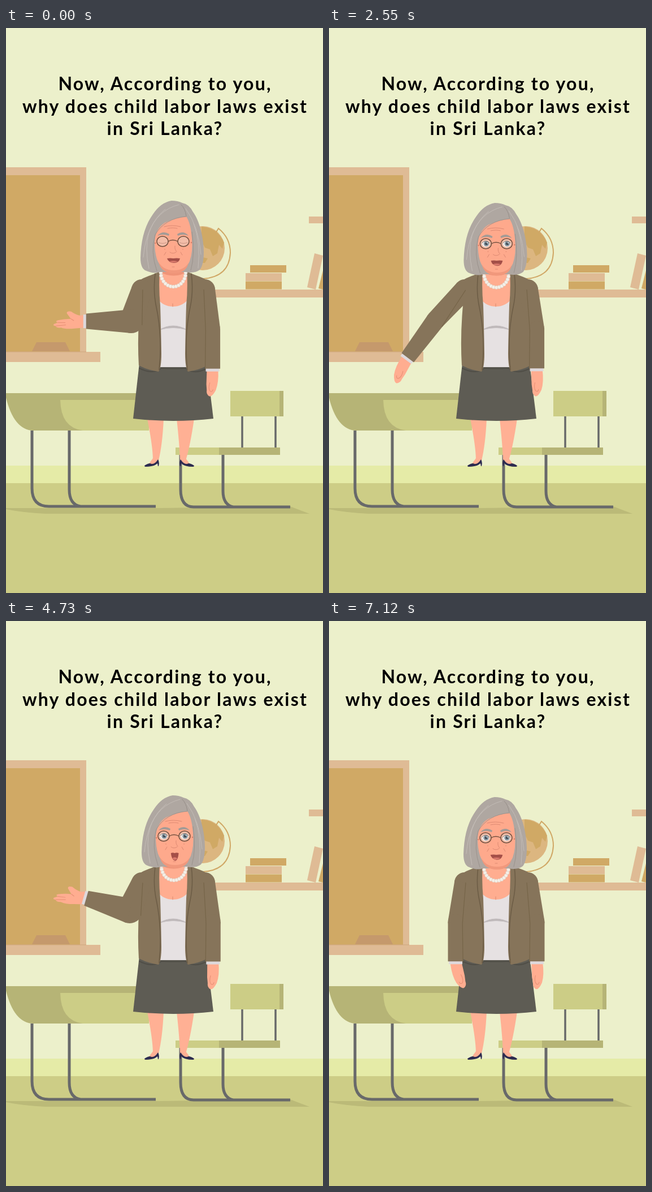
Write an HTML page that moves like this. It is 561 px wide and 998 px high and loops after 7.18 s.

```html
<!DOCTYPE html>
<html lang="en">
<head>
<meta charset="utf-8">
<title>Classroom question</title>
<style>
html, body { margin: 0; height: 100%; overflow: hidden; background: #ecf0cb; }
svg { display: block; width: 100vw; height: 100vh; }
text { font: 700 32px Lato, sans-serif; letter-spacing: 2.2px; text-anchor: middle; }
.line { fill: none; stroke-linecap: round; }
</style>
</head>
<body>
<svg viewBox="0 0 561 998">
  <rect width="561" height="998" fill="#ecf0cb"/>
  <rect y="773" width="561" height="31" fill="#e5eba7"/>
  <rect y="804" width="561" height="194" fill="#cdcd86"/>
  <path d="M0 848H265L503 845L537 858H70Q30 856 0 850Z" fill="#bbba78"/>
  <text x="281.5" y="110">Now, According to you,</text>
  <text x="281.5" y="149.5">why does child labor laws exist</text>
  <text x="281.5" y="189">in Sri Lanka?</text>

  <!-- board -->
  <path d="M0 246H142V572H167V590H0Z" fill="#dfbb95"/>
  <path d="M0 260H131V572H0Z" fill="#d0a965"/>
  <path d="M54 555H105L113 571H46Z" fill="#c5996c"/>
  <path d="M0 572H142" stroke="#cfa77f"/>

  <!-- shelf, books and globe -->
  <path d="M330 462H561V476H330ZM536 333H561V345H536ZM424 433H488V447H424Z" fill="#dfbb95"/>
  <path d="M432 419H496V432H432ZM424 447.5H488V461.5H424ZM561 428L553 460L561 462Z" fill="#d0a965"/>
  <path d="M546 398L561 402L548 462L533 458Z" fill="#dfbb95"/>
  <circle cx="348" cy="389" r="39" fill="#dcb680"/>
  <path d="M346 351Q374 352 386 379L383 390L377 383L374 398L366 403L361 391L352 388L346 376ZM340 403L357 407L352 415L340 415Z" fill="#d0a965"/>
  <path class="line" d="M371 362L376 354Q397 371 397 397Q395 440 348 443Q338 443 330 440" stroke="#d0a765" stroke-width="2"/>

  <!-- desk -->
  <g fill="none" stroke="#68696a" stroke-width="5">
    <path d="M112 711V815Q112 842 132 845M46 711V813Q46 845 76 845H265"/>
    <path d="M384 754V818Q384 842 402 846M309 754V815Q309 846 332 846H503"/>
    <path d="M418 686V742M477 686V742" stroke-width="3.5"/>
  </g>
  <path d="M0 645H253V711H48Q14 710 0 653Z" fill="#b6b476"/>
  <path d="M96 657H253V711H136Q97 706 96 657Z" fill="#cccd86"/>

  <!-- chair -->
  <path d="M397 641H491V686H397ZM300 741H378V754H300Z" fill="#cccd86"/>
  <path d="M484 641H491V686H484ZM377 741H485V754H377Z" fill="#b6b476"/>

  <!-- legs and shoes -->
  <defs>
    <g id="shoe">
      <path d="M260 760H270L269 769L259 771L252 771Z" fill="#ffb094"/>
      <path d="M245 773Q251 769 255 769Q262 773 269 762Q272 767 270 774H269L268 769Q262 775 247 775Q245 775 245 773Z" fill="#2c2b50"/>
    </g>
  </defs>
  <path d="M250 690H279Q277 735 270 764H260Q260 740 250 690ZM302 690H333Q326 738 318 764H308Q307 735 302 690Z" fill="#ffb094"/>
  <use href="#shoe"/><use href="#shoe" transform="matrix(-1 0 0 1 578 0)"/>

  <!-- skirt, blouse and jacket -->
  <path d="M236 592H355L367 690Q296 698 225 690Z" fill="#5e5c54"/>
  <path d="M236 601Q260 613 275 601Q296 602 318 601Q332 613 354 602" class="line" stroke="#504e47" stroke-width="2"/>
  <path d="M268 418H324V510H268Z" fill="#ffad90"/>
  <path d="M270 424H322V430Q297 445 270 430Z" fill="#ef9478"/>
  <path d="M268 478Q278 492 296 492Q312 492 324 478V599H268Z" fill="#e6e1e2"/>
  <path d="M272 533Q283 526 296 526Q308 526 320 533Q296 526 272 533Z" fill="#bdb7b8" stroke="#c8c2c4"/>
  <path class="line" d="M295 487V492" stroke="#d98a70"/>
  <defs>
    <g id="jacket">
      <path d="M272 430Q264 434 250 439Q233 445 225 456L237 490Q232 545 235 596Q250 604 270 607Q275 600 275 575Q274 520 273 490Q270 460 272 430Z" fill="#86745a"/>
      <path class="line" d="M264 434Q260 465 266 493Q277 545 271 604" stroke="#6d5d46" stroke-width="1.6"/>
    </g>
  </defs>
  <use href="#jacket"/><use href="#jacket" transform="matrix(-1 0 0 1 592 0)"/>
  <g id="armL"></g>
  <g transform="matrix(-1 0 0 1 592 0)"><g id="armR"></g></g>
  <g id="pearls" fill="#f5f0e8" stroke="#d9cabd" stroke-width=".6"></g>

  <!-- head -->
  <g id="head">
    <path d="M293 305Q304 305 312 309Q324 311 331 325C343 341 350 372 350 396Q350 418 343 427Q334 434 318 431H272Q262 435 246 428Q238 423 238 406C239 375 245 350 260 329Q274 308 293 305Z" fill="#afa7a1"/>
    <path d="M263 378Q264 355 281 344Q300 335 319 333Q327 345 329 372Q331 395 325 412Q318 428 297 429Q274 428 267 408Q263 395 263 378Z" fill="#fea98c"/>
    <path d="M270 414Q279 428 297 428Q315 428 323 415Q319 433 297 433Q275 433 270 414Z" fill="#f1987c"/>
    <g class="line" stroke="#c3bcb6">
      <path d="M306 312Q267 322 253 362Q245 388 253 425M282 320Q248 347 243 405M332 345Q345 380 340 424M318 319Q341 350 345 400"/>
      <path d="M319 333Q281 336 264 365Q255 395 267 429M329 360Q335 400 327 428" stroke="#9a928c"/>
      <path d="M310 312Q317 319 319 332" stroke="#968e88"/>
    </g>
    <g class="line" stroke="#d98670" stroke-width=".9">
      <path d="M280 351Q294 347 309 351M286 354Q296 352 303 354M290 396Q295 400 301 396M299 385Q298 391 302 395M283 396L280 401M309 396L312 401M294 422H298"/>
    </g>
    <path d="M268 367Q277 357 289 364L288 367Q278 363 268 367ZM323 367Q314 357 303 364L304 367Q313 363 323 367Z" fill="#a39b96"/>
    <g fill="#d98069"><circle cx="264" cy="380" r="1.3"/><circle cx="328" cy="379" r="1.3"/><circle cx="281" cy="391" r=".7"/><circle cx="313" cy="391" r=".7"/></g>
    <g fill="#f2bda8"><ellipse cx="277" cy="377" rx="10" ry="9"/><ellipse cx="314" cy="377" rx="10" ry="9"/></g>
    <path class="line" d="M270 379Q277 382 284 379M307 379Q314 382 321 379" stroke="#c99482"/>
    <g id="eyes">
      <g id="eye">
        <ellipse cx="277" cy="377" rx="7" ry="5.5" fill="#f3eeeb"/>
        <circle cx="278" cy="377" r="4.6" fill="#8495a0"/><circle cx="278" cy="377" r="2.2" fill="#3c4650"/>
        <circle cx="279.5" cy="375.5" r="1" fill="#fff"/>
        <path class="line" d="M270 376Q277 368 284 376" stroke="#77695f"/>
      </g>
      <use href="#eye" x="37"/>
    </g>
    <g class="line" stroke="#70503f" stroke-width="1.4">
      <ellipse cx="277" cy="377" rx="10" ry="9"/><ellipse cx="314" cy="377" rx="10" ry="9"/>
      <path d="M287 377Q295 372 304 377"/>
    </g>
    <g id="mouth">
      <path d="M285 407Q291 406 296 407Q302 406 308 407Q306 415 297 415Q287 414 285 407Z" fill="#a44f48"/>
      <path d="M289 412.5Q296 410 304 412.5Q297 416 289 412.5Z" fill="#d9796c"/>
    </g>
  </g>
</svg>
<script>
const $ = id => document.getElementById(id);
const LOOP = 7180, BLINK = 1980, JACKET = '#86745a';

// Pose: upper arm angle and length, forearm angle and length, hand angle.
// Angles are in degrees from straight down, growing outwards.
const point = [18, 59, 90, 80, 91];
const raise = [23, 54, 106, 80, 97];
const open  = [23, 54, 106, 80, 115];
const reach = [86, 80, 88, 100, 86];
const down  = [11, 71, 0, 70, -2];
const wide  = [13, 71, 0, 70, -13];
const swing = [13, 71, 0, 70, 3];

// time, pose, head x, head y, mouth opening, spread of the other arm
const keys = [
  [0, point, 0, 0, 0, 0],
  [430, point, 0, 0, 0, 0],
  [620, raise, 1, 5, .5, .8],
  [760, raise, 2, 3, 1, .3],
  [1000, open, 3, 0, 0, 0],
  [2080, open, 3, 0, 0, 0],
  [2340, reach, 1, 4, .3, .6],
  [2720, wide, 0, 4, .2, 1],
  [2960, down, 0, 0, 0, 0],
  [3040, down, 0, 0, 0, 0],
  [3240, wide, 0, 6, .2, 1],
  [3650, point, 0, 0, 0, 0],
  [4400, point, 0, 0, 0, 0],
  [4590, raise, 1, 5, .5, .8],
  [4730, raise, 2, 3, 1, .3],
  [4970, open, 3, 0, 0, 0],
  [6150, open, 3, 0, 0, 0],
  [6780, down, 0, 2, .2, .6],
  [7120, wide, 0, 6, .15, 1],
  [LOOP, wide, 0, 6, .15, 1]
];

const mix = (a, b, k) => Array.isArray(a) ? a.map((v, i) => mix(v, b[i], k)) : a + (b - a) * k;
const step = ([x, y], deg, len) => {
  const a = deg * Math.PI / 180;
  return [x - Math.sin(a) * len, y + Math.cos(a) * len];
};
const disc = ([x, y], r) => `<circle cx="${x}" cy="${y}" r="${r}" fill="${JACKET}"/>`;
const limb = (p, q, deg, r1, r2) => {
  const corners = [step(p, deg + 90, r1), step(q, deg + 90, r2), step(q, deg - 90, r2), step(p, deg - 90, r1)];
  return `<path d="M${corners.join('L')}Z" fill="${JACKET}"/>`;
};

const palm = '<path d="M0 12L10 10Q18 11 27 17Q36 18 34 13L27 4Q38 4 50 1Q56 -1 50 -3L57 -6Q59 -9 54 -9Q52 -13 44 -12Q36 -15 20 -13L0 -11Z" fill="#ffad90"/>' +
  '<path class="line" d="M27 4L22 1M50 -3L37 -3M53 -9L36 -7" stroke="#e58d73"/>';
const fist = '<path d="M2 10Q24 12 38 7Q50 1 49 -4Q46 -10 38 -9L28 -10L2 -10Z" fill="#ffad90"/>' +
  '<path class="line" d="M25 -4Q35 -7 40 -3Q42 1 37 2" stroke="#e58d73"/>';

function arm([ua, ul, fa, fl, ha]) {
  const s = [240, 462], e = step(s, ua, ul), w = step(e, fa, fl);
  const elbow = 13.5 + fa / 12;   // a bent sleeve bulges
  const seam = [step(s, ua - 90, 2), step(e, ua - 90, elbow - 1)];
  if (fa < 30) seam.push(step(w, fa - 90, 13));
  return `<g transform="translate(${w}) rotate(${90 + ha})">${fa > 45 ? palm : fist}</g>
    <path transform="translate(${w}) rotate(${90 + fa})" d="M-3 -12H5V12H-3Z" fill="#ded9dc"/>
    ${disc(s, 18)}${limb(s, e, ua, 18, elbow)}${disc(e, elbow)}${limb(e, w, fa, elbow, 13.5)}
    <path class="line" d="M${seam.join('L')}" stroke="#766549" stroke-width="1.2" stroke-linejoin="round"/>`;
}

for (let i = 0; i < 15; i++) {
  const a = Math.PI * i / 14;
  $('pearls').innerHTML += `<circle cx="${296 - 22 * Math.cos(a)}" cy="${432 + 25 * Math.sin(a)}" r="3.1"/>`;
}

const scaleAt = (x, y, sx, sy) => `translate(${x} ${y}) scale(${sx} ${sy}) translate(${-x} ${-y})`;

function draw(now) {
  const t = now % LOOP;
  const i = keys.findIndex(k => k[0] > t);
  const a = keys[i - 1], b = keys[i];
  const k = (t - a[0]) / (b[0] - a[0]);
  const [, pose, hx, hy, talk, spread] = mix(a, b, k * k * (3 - 2 * k));

  $('armL').innerHTML = arm(pose);
  $('armR').innerHTML = arm(mix(down, swing, spread));
  $('head').setAttribute('transform', `translate(${hx} ${hy})`);
  $('pearls').setAttribute('transform', `translate(${hx / 2} ${hy / 3})`);
  $('mouth').setAttribute('transform', scaleAt(297, 407, 1 - .4 * talk, 1 + .7 * talk));

  const phase = t % BLINK, gap = Math.min(phase, BLINK - phase);
  const lid = Math.min(1, Math.max(0, (gap - 10) / 50));
  $('eyes').setAttribute('transform', scaleAt(277, 379, 1, lid));
  $('eyes').setAttribute('visibility', lid ? 'visible' : 'hidden');
  requestAnimationFrame(() => draw(performance.now() - start));
}
const start = performance.now();
draw(0);
</script>
</body>
</html>
```
